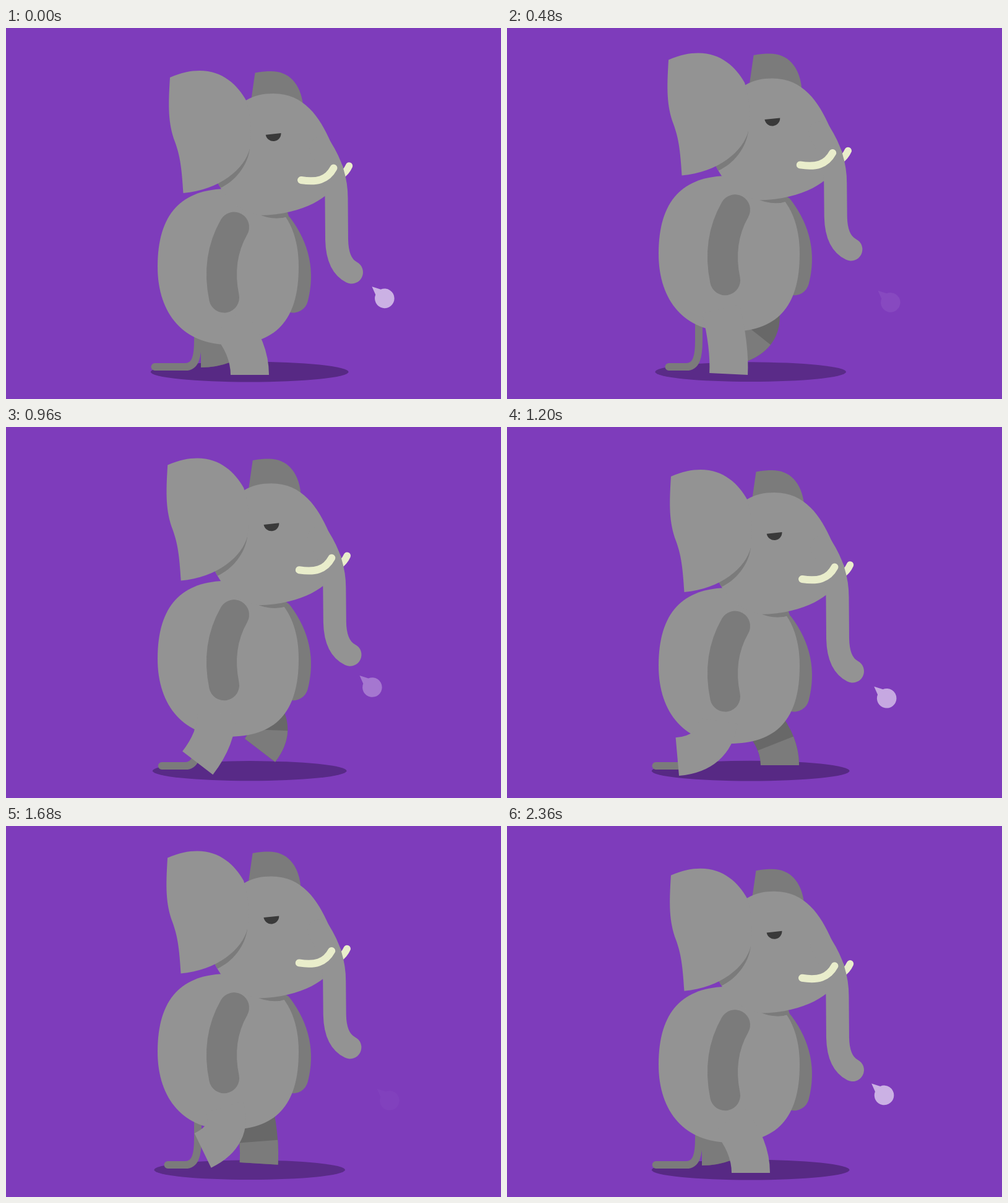
An HTML page with a canvas that plays this animation: 800 px wide and 600 px high, repeating every 2.4 s.

```html
<!DOCTYPE html>
<html lang="en">
<head>
<meta charset="utf-8">
<title>Walking elephant</title>
<style>
html, body { margin: 0; width: 100%; height: 100%; overflow: hidden; background: #7e3cbb; }
canvas { display: block; }
</style>
</head>
<body>
<canvas id="stage" width="800" height="600"></canvas>
<script>
const ctx = document.getElementById('stage').getContext('2d');
const LOOP = 2400, STEP = LOOP / 2, DRIFT = 800, SWITCH = 360, TICK = 40;
const BG = '#7e3cbb', LIGHT = '#939393', DARK = '#7b7b7b', DEEP = '#686868', IVORY = '#e9edcb';

const mix = (a, b, k) => a + (b - a) * k;
const sine = u => Math.sin(u * Math.PI / 2);
const smooth = u => sine(u) ** 2;
const settle = u => (u + sine(u)) / 2;

// Rises until `peak`, then drops to rest shortly before the step ends
function bounce(t, peak, rise) {
  const p = t % STEP;
  return p < peak ? rise(p / peak) : 1 - smooth(Math.min(1, (p - peak) / (STEP - 15 - peak)));
}
const liftAt = t => 25.5 * bounce(t, 700, u => mix(smooth(u), sine(u), 0.45));
const swayAt = t => bounce(t, DRIFT, smooth);

// Key poses of the stride
const NEAR_LEG = [
  { x: 425, y: 561, angle: 0, hip: 359 },
  { x: 374, y: 561, angle: 4, hip: 340 },
  { x: 278, y: 564, angle: 85, hip: 342 },
  { x: 354, y: 548, angle: 55.5, hip: 358 }
];
const FAR_LEG = [
  { x: 472, y: 547, angle: 0, hip: 399 },
  { x: 426, y: 548, angle: 5, hip: 396 },
  { x: 315, y: 549, angle: 90, hip: 397 },
  { x: 409, y: 538, angle: 64, hip: 406 }
];

// Each half of the stride is a slow drift followed by a quick switch
function poseAt(poses, t) {
  const p = t % STEP, drifting = p < DRIFT;
  const i = 2 * Math.floor(t % LOOP / STEP) + (drifting ? 0 : 1);
  const k = drifting ? settle(p / DRIFT) : smooth(Math.min(1, (p - DRIFT) / SWITCH));
  const from = poses[i], to = poses[(i + 1) % 4];
  const pose = {};
  for (const key in from) pose[key] = mix(from[key], to[key], k);
  return pose;
}

function fill(d, color) {
  ctx.fillStyle = color;
  ctx.fill(new Path2D(d));
}

function stroke(d, color, width, cap = 'round') {
  ctx.strokeStyle = color;
  ctx.lineWidth = width;
  ctx.lineCap = cap;
  ctx.stroke(new Path2D(d));
}

function shifted(dx, dy, draw) {
  ctx.save();
  ctx.translate(dx, dy);
  draw();
  ctx.restore();
}

function groundShadow(lift) {
  const k = lift / 24;
  ctx.fillStyle = `rgba(28, 14, 50, ${0.395 - 0.03 * k})`;
  ctx.beginPath();
  ctx.ellipse(393.7, 556.2, 159.8 - 6.4 * k, 16.4 - 0.6 * k, 0, 0, 7);
  ctx.fill();
}

function tail(lift) {
  stroke(`M310 ${490 - lift} L310 505 C310 532 306 548 290 548 L${240.5 + lift} 548`, DARK, 12);
}

// The limb runs from the sole up to the hip
function leg({ x, y, angle, hip }, hipY, color, shade) {
  const a = angle * Math.PI / 180, sin = Math.sin(a), cos = Math.cos(a);
  const footX = x - 31 * cos, footY = y - 31 * sin;
  const reach = 44 + angle / 90 * 16;
  const d = `M${footX} ${footY} Q${footX + reach * sin} ${footY - reach * cos} ${hip} ${hipY}`;
  stroke(d, shade || color, 62, 'butt');
  if (shade) {
    ctx.setLineDash([36, 999]);
    stroke(d, color, 62, 'butt');
    ctx.setLineDash([]);
  }
}

function puff(t, birth) {
  const age = (t - birth + LOOP) % LOOP;
  if (age > 780) return;
  const x = 620.3 - 36.2 * Math.exp(-age / 165);
  const y = 437 + 0.82 * (x - 611.5);
  ctx.globalAlpha = 0.6 * Math.min(1, age / 80, (780 - age) / 540);
  shifted(x, y, () => fill('M15.8 0 A15.8 15.8 0 1 1 -14.6 -6 L-20.4 -19 L-6.2 -14.5 A15.8 15.8 0 0 1 15.8 0 Z', '#fff'));
  ctx.globalAlpha = 1;
}

const BODY = 'M359 260 C284 260 245 300 245 386 C245 464 289 512 359 512 C435 512 473 474 473 386 C473 306 429 260 359 260 Z';
const HEAD = 'M388 117 C401 109 416 106 432 106 C482 106 507 144 525 185 L545 225 L534 250 ' +
  'C526 270 484 302 410 303 C382 298 358 282 341 248 Z';
const EAR = 'M265 80 C283 72 299 69 313 69 C350 69 374 92 388 117 C396 142 398 170 394 195 ' +
  'C386 228 345 262 286.5 267 C284 225 281 206 273 184 C262 154 262 128 265 80 Z';
const EAR_SHADE = 'M394 195 C390 224 370 248 345 259.5 L334 252 Z';
const FAR_EAR = 'M402.5 72.5 C412 70.5 421 70 429 70 C457 70 476 90 480 124 L440 135 L396 118 Z';

function head(lift, sway) {
  const dx = -5 * sway, dy = -lift - 5.5 * sway;
  const earX = -6 * sway, earY = -lift - 11.5 * sway;
  const curl = -19 * sway;

  shifted(earX, earY, () => fill(FAR_EAR, DARK));
  shifted(dx, dy, () => {
    fill('M405 300 Q433 313 457 304.5 L452 288 Z', DARK);
    stroke('M554.5 223 Q550 233 541 239', IVORY, 11.5);
    fill(HEAD, LIGHT);
    stroke(`M509 194 C525 219 534 244 534 275 L534.5 ${342 + curl} ` +
      `C535 ${370 + curl} 543 ${387 + curl} ${558.5 + sway} ${395 + curl}`, LIGHT, 37);
  });

  ctx.save();
  ctx.translate(dx, dy);
  ctx.clip(new Path2D(HEAD));
  ctx.translate(earX - dx, earY - dy);
  fill(EAR_SHADE, DARK);
  ctx.restore();
  shifted(earX, earY, () => fill(EAR, LIGHT));

  shifted(dx, dy, () => {
    fill('M419.7 172.7 L444.5 170 A12.5 12.5 0 0 1 419.7 172.7 Z', '#3a3a3a');
    stroke('M477 246 C502 250 519 246 529.5 226.5', IVORY, 12);
  });
}

function draw(t) {
  const lift = liftAt(t), sway = swayAt(t);
  const armY = -lift - 11 * sway;

  ctx.fillStyle = BG;
  ctx.fillRect(0, 0, 800, 600);
  groundShadow(lift);
  tail(lift);
  leg(poseAt(FAR_LEG, t + STEP), 462 - lift, DARK, DEEP);
  shifted(0, armY, () => stroke('M440 322 Q479.5 375 464 436', DARK, 49));
  shifted(0, -lift, () => fill(BODY, LIGHT));
  leg(poseAt(NEAR_LEG, t), 475 - lift, LIGHT);
  shifted(0, armY, () => stroke('M368.5 322 Q339.5 373 352.5 436', DARK, 49));
  puff(t, 920);
  puff(t, 2160);
  head(lift, sway);
}

const start = performance.now();
function frame() {
  const elapsed = Math.max(0, performance.now() - start) % LOOP;
  draw(Math.floor(elapsed / TICK) * TICK);
  requestAnimationFrame(frame);
}
frame();
</script>
</body>
</html>
```
